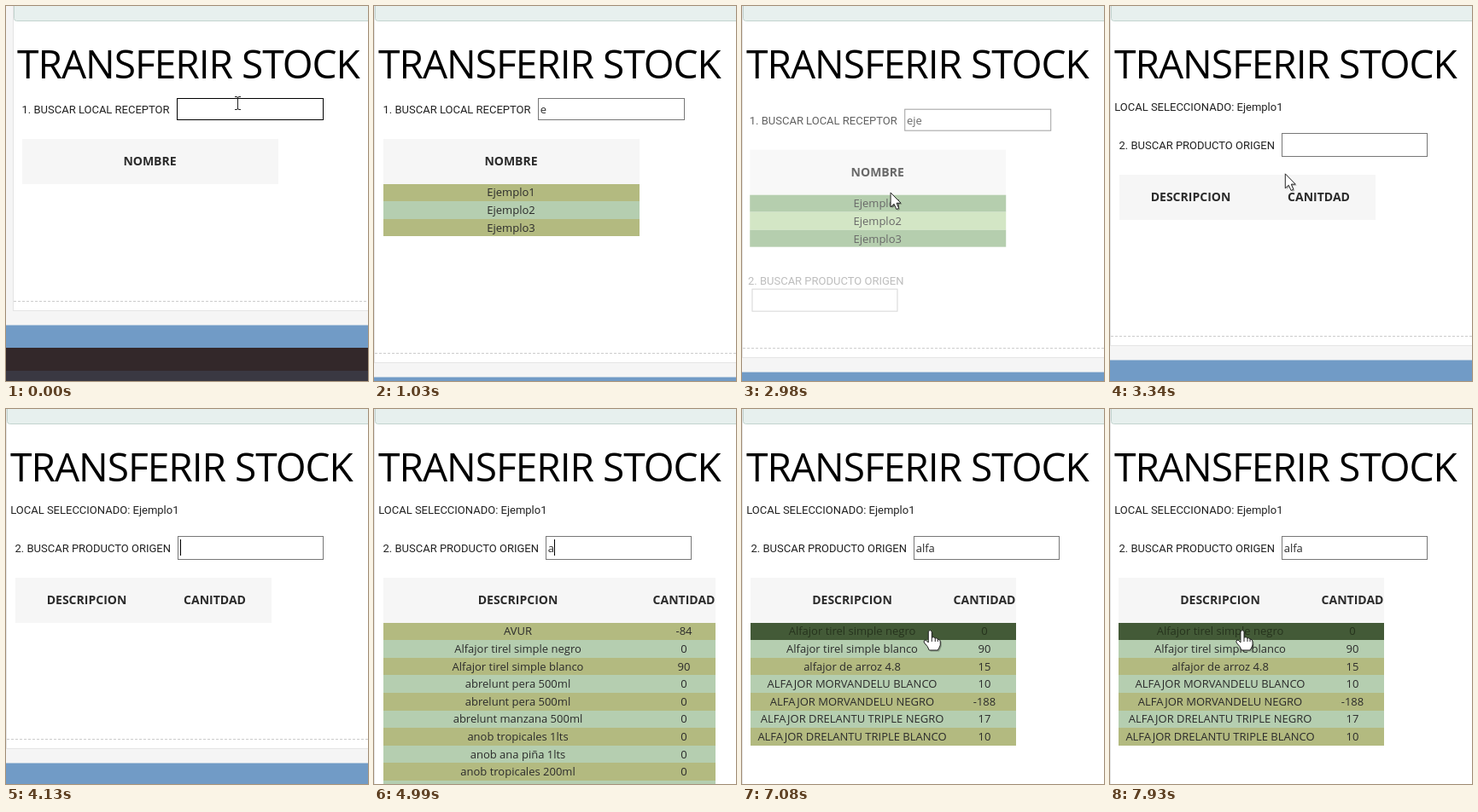
Write an HTML page that moves like this. It is 424 px wide and 440 px high and loops after 7990 ms.

```html
<!DOCTYPE html>
<html lang="es">
<head>
<meta charset="utf-8">
<title>Transferir stock</title>
<style>
html, body { margin: 0; width: 100%; height: 100%; overflow: hidden; background: #fff; }
svg { display: block; width: 424px; height: 440px; }
text { font: 13px "Open Sans", sans-serif; fill: #2b2b2b; white-space: pre; }
.title { font-size: 46px; letter-spacing: -1px; fill: #000; }
.label { font-family: Roboto, sans-serif; fill: #222; }
.head { font-size: 14px; font-weight: 700; }
.mid { text-anchor: middle; }
</style>
</head>
<body>
<svg id="stage" viewBox="0 0 424 440" width="424" height="440"></svg>
<script>
const LOOP = 7990;
const ROW = 20.6;
const OLIVE = '#b3ba80', GREEN = '#b5ceb0';
const stage = document.getElementById('stage');

// Time, text in the focused field
const keys1 = [[250, ''], [630, 'e'], [1230, 'ej'], [1630, 'eje']];
const keys2 = [[3900, ''], [4790, 'a'], [5190, 'al'], [5710, 'alf'], [6560, 'alfa']];

// Time, x, y, shape (i = beam, a = arrow, h = hand, '' = hidden)
const path = [
  [0, 271, 114, 'i'], [60, 271, 114, 'i'], [330, 372, 138, 'a'], [430, 385, 154, 'a'], [630, 385, 154, ''],
  [1890, 412, 205, 'a'], [2130, 221, 213, 'a'], [2250, 205, 216, 'h'], [2680, 176, 220, 'h'],
  [2740, 174, 219, 'a'], [2980, 174, 219, 'a'], [3340, 205, 197, 'a'], [3500, 250, 172, 'i'],
  [3600, 262, 163, 'i'], [4130, 266, 163, ''],
  [6040, 300, 163, 'i'], [6140, 284, 178, 'a'], [6340, 250, 255, 'a'], [6460, 243, 246, 'a'],
  [6600, 240, 256, 'h'], [6900, 240, 260, 'h'], [7680, 155, 260, 'h'], [7990, 155, 260, 'h']
];

const names = rows => rows.map(r => r.split('|'));
const locals = names(['Ejemplo1', 'Ejemplo2', 'Ejemplo3']);
const lists = {
  a: names(['AVUR|-84', 'Alfajor tirel simple negro|0', 'Alfajor tirel simple blanco|90',
    'abrelunt pera 500ml|0', 'abrelunt pera 500ml|0', 'abrelunt manzana 500ml|0',
    'anob tropicales 1lts|0', 'anob ana piña 1lts|0', 'anob tropicales 200ml|0', '|']),
  alf: names(['Alfajor tirel simple negro|0', 'Alfajor tirel simple blanco|90', 'alf len ddl/chocolate 47g|0',
    'alf. tirel triple negro 60 gr|0', 'alf. mini torta aprelo fruto rojos|0', 'alf. minitorta clasica 72 gr|0',
    'alf. tulo triple blanco 73 gr|0', 'alf. minitorta coco 73g|-3', 'alf. triple brusk 60 g|0', '|']),
  alfa: names(['Alfajor tirel simple negro|0', 'Alfajor tirel simple blanco|90', 'alfajor de arroz 4.8|15',
    'ALFAJOR MORVANDELU BLANCO|10', 'ALFAJOR MORVANDELU NEGRO|-188',
    'ALFAJOR DRELANTU TRIPLE NEGRO|17', 'ALFAJOR DRELANTU TRIPLE BLANCO|10'])
};

const clamp = v => Math.min(1, Math.max(0, v));
const swing = v => 0.5 - Math.cos(clamp(v) * Math.PI) / 2;
const rect = (x, y, w, h, fill, more = '') => `<rect x="${x}" y="${y}" width="${w}" height="${h}" fill="${fill}" ${more}/>`;
const text = (x, y, s, cls = '', more = '') => `<text x="${x}" y="${y}" class="${cls}" ${more}>${s}</text>`;
const group = (x, y, inner, more = '') => `<g transform="translate(${x} ${y})" ${more}>${inner}</g>`;
const clip = (id, h, inner) =>
  `<clipPath id="${id}"><rect x="-10" width="440" height="${Math.max(0, h)}"/></clipPath><g clip-path="url(#${id})">${inner}</g>`;
const at = (keys, t) => keys.filter(k => k[0] <= t).pop();

function field(x, y, w, h, base, key, t, stroke = '#777') {
  let out = rect(x + 0.5, y + 0.5, w, h, '#fff', `stroke="${stroke}"`);
  if (!key) return out;
  const [since, value] = key;
  out += text(x + 2.7, base, value);
  if (t !== null && (t - since) % 700 < 400) {
    const wide = { a: 7.2, l: 3.3, f: 4.4, e: 7.3, j: 3.3 };
    const cx = Math.round(x + 2.7 + [...value].reduce((s, c) => s + wide[c], 0));
    out += rect(cx, y + 4, 1, 19, '#000');
  }
  return out;
}

function table(x, y, w, heads, cols, rows, hover, color) {
  let out = rect(x, y, w, 53, '#f6f6f6');
  heads.forEach((s, i) => out += text(cols[i], y + 31, s, 'head mid'));
  rows.forEach((cells, r) => {
    const top = y + 52.6 + r * ROW, hot = hover && r === 0;
    const y0 = Math.round(top), y1 = Math.round(top + ROW);
    out += rect(x, y0, w, y1 - y0, hot ? '#435a37' : color(r));
    cells.forEach((s, i) => out += text(cols[i], Math.round(top + 14.8), s, 'mid', hot ? 'style="fill:#26331d"' : ''));
  });
  return out;
}

const zebra = r => r % 2 ? GREEN : OLIVE;
const picked = r => r % 2 ? '#c2dcad' : '#97ba8d';

function receptor(t, p) {
  const key = at(keys1, t), found = t >= 630;
  return text(10.5, 126, '1. BUSCAR LOCAL RECEPTOR', 'label') +
    field(192, 108, 171, 25, 126, key, p > 0 ? null : t, t < 250 ? '#000' : '#777') +
    table(11, 156, 300, ['NOMBRE'], [160.5], found ? locals : [], t > 1990 && p === 0, p > 0 ? picked : zebra);
}

function origin(t, p) {
  const key = at(keys2, t);
  const label = text(10.5, 168, '2. BUSCAR PRODUCTO ORIGEN', 'label');
  if (p < 0.8) return label + field(15, 173, 170, 26, 192, null, t);
  let x = 11, w = 300, cols = [94.5, 244.5], rows = [], heads = ['DESCRIPCION', 'CANITDAD'];
  if (t >= 4990) {
    heads = ['DESCRIPCION', 'CANTIDAD'];
    w = 389; cols = [168.5, 363]; rows = t < 5250 ? lists.a : lists.alf;
  }
  if (t >= 6600) {
    x = 10; w = 311; cols = [129, 284]; rows = lists.alfa;
  }
  return label + field(201, 149, 170, 27, 168, key, t) + table(x, 198, w, heads, cols, rows, t > 6340, zebra);
}

function cursor(t) {
  const i = path.findLastIndex(k => k[0] <= t);
  const [t0, x0, y0, kind] = path[i], next = path[i + 1] || path[i];
  if (!kind) return '';
  const k = next[0] > t0 ? (t - t0) / (next[0] - t0) : 0;
  const x = x0 + (next[1] - x0) * k, y = y0 + (next[2] - y0) * k;
  if (kind === 'i') {
    return group(Math.round(x), Math.round(y),
      '<path d="M-3 -7.5H-1Q0.5 -7.5 0.5 -6V6Q0.5 7.5 -1 7.5H-3M4 -7.5H2Q0.5 -7.5 0.5 -6M4 7.5H2Q0.5 7.5 0.5 6" fill="none" stroke="#222"/>');
  }
  const d = kind === 'a'
    ? 'M0 0V17L4 13.4L6.8 19.6L9.6 18.3L7 12.3H12Z'
    : 'M-2 1Q0 -2 2 1V8Q5 7 6 9Q8 8 9 10Q12 10 12 13V17Q11 20 9 23H-1Q-2 19 -7 14Q-8 11 -5 11L-2 14Z';
  return group(x, y, `<path d="${d}" transform="translate(1.5 1.5)" opacity=".25"/>` +
    `<path d="${d}" fill="#fff" stroke="#222" stroke-linejoin="round"/>` +
    (kind === 'h' ? '<path d="M2 8V13M6 9V13M9 10V13" stroke="#222" fill="none"/>' : ''));
}

function page(t, p) {
  const left = t < 630 ? 8 : 0;
  const line = t < 630 ? 346.5 : t >= 4990 ? 532 : 407.5 - 20 * p;
  const foot = line + 28;
  let body = rect(0.5, -5, 440, line + 16, '#fff', 'stroke="#e4e4e4"') +
    rect(1.5, -8, 440, 25.5, '#e7f0ee', 'rx="3" stroke="#c2d3ce"') +
    `<path d="M1 ${line}H424" stroke="#ccc" stroke-dasharray="3 2"/>` +
    text(5, 84.5, 'TRANSFERIR STOCK', 'title');
  if (p < 1) {
    body += group(-6 * p, 43 * p, group(0, 107, clip('c1', 255 * (1 - p), group(0, -107, receptor(t, p)))), `opacity="${1 - p}"`);
  }
  if (p > 0) {
    const grow = p < 1 ? 190 * p : 400;
    body += group(0, 108, clip('c2', p < 1 ? 16 * p : 30, group(0, -108, text(5.2, 122.5, 'LOCAL SELECCIONADO: Ejemplo1', 'label'))), `opacity="${p}"`);
    body += group(-5 * (1 - p), 225 * (1 - p), group(0, 148, clip('c3', grow, group(0, -148, origin(t, p)))), `opacity="${p}"`);
  }
  return rect(0, 0, 424, 440, '#f5f5f5') + group(left, 0, body) +
    rect(0, foot, 424, 27, '#719bc6') + rect(0, foot + 26.5, 424, 27, '#33282a') + rect(0, foot + 53.5, 424, 60, '#3a3842');
}

function render(now) {
  const t = now % LOOP;
  const p = t >= 3330 ? 1 : swing((t - 2780) / 550);
  stage.innerHTML = page(t, p) + cursor(t);
}

const start = performance.now();
function tick() {
  render(performance.now() - start);
  requestAnimationFrame(tick);
}
tick();
</script>
</body>
</html>
```
